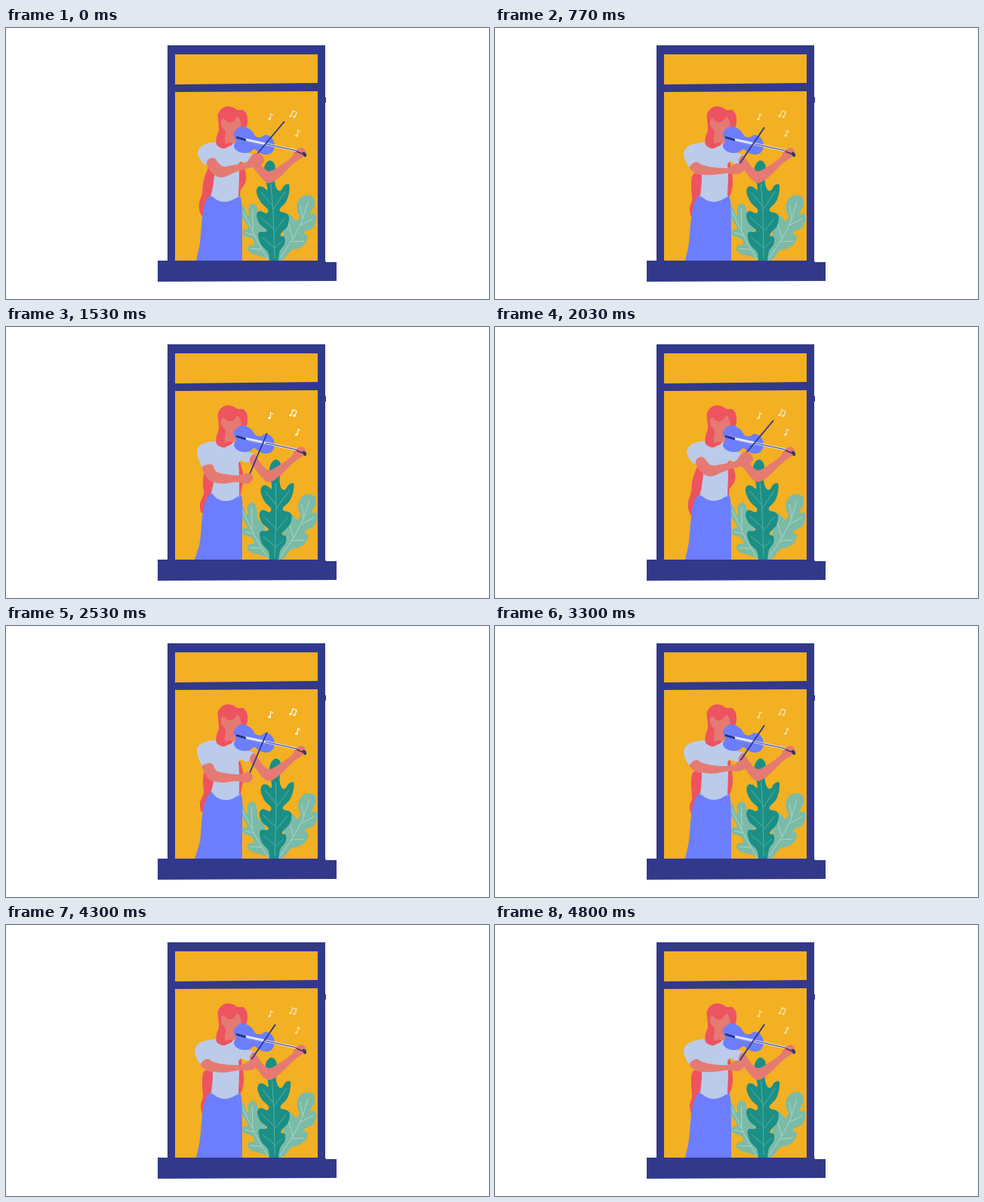
Animation, 640 px wide and 360 px high, one loop 5.01 s. Source, as an HTML page with a canvas:

```html
<!DOCTYPE html>
<html lang="en">
<head>
<meta charset="utf-8">
<title>Violinist at the window</title>
<style>
  html, body { margin: 0; width: 100%; height: 100%; overflow: hidden; background: #fff; }
  canvas { display: block; width: 640px; height: 360px; }
</style>
</head>
<body>
<canvas id="stage" width="640" height="360"></canvas>
<script>
const ctx = document.getElementById('stage').getContext('2d');
const LOOP = 5010;
const CHANGES = [0, 270, 500, 770, 1030, 1270, 1530, 1770, 2030, 2300,
  2530, 2800, 3030, 3300, 3530, 3800, 4070, 4300, 4570, 4800];

const navy = '#32398b', yellow = '#f2b022', red = '#ee5360', skin = '#e57a72',
  shirtBlue = '#bccbe9', blue = '#6c7efe', teal = '#1b8f86', mint = '#7bbba8', pale = '#b9dccb';

const points = text => text.trim().split(/\s+/).map(p => p.split(',').map(Number));

// Closed smooth outline; a repeated point makes a corner.
function blob(text, color) {
  const p = points(text), n = p.length;
  ctx.beginPath();
  ctx.moveTo(...p[0]);
  for (let i = 0; i < n; i++) {
    const [a, b, c, d] = [-1, 0, 1, 2].map(k => p[(i + k + n) % n]);
    ctx.bezierCurveTo(b[0] + (c[0] - a[0]) / 6, b[1] + (c[1] - a[1]) / 6,
      c[0] - (d[0] - b[0]) / 6, c[1] - (d[1] - b[1]) / 6, c[0], c[1]);
  }
  ctx.fillStyle = color;
  ctx.fill();
}

function poly(text, color) {
  ctx.beginPath();
  points(text).forEach(p => ctx.lineTo(...p));
  ctx.fillStyle = color;
  ctx.fill();
}

function line(text, color, width) {
  ctx.beginPath();
  points(text).forEach(p => ctx.lineTo(...p));
  ctx.strokeStyle = color;
  ctx.lineWidth = width;
  ctx.stroke();
}

// Leans a leaf sideways about its root on the sill.
function leaf(lean, outline, color, veins, veinColor) {
  ctx.save();
  ctx.transform(1, 0, -lean / 130, 1, lean / 130 * 309, 0);
  blob(outline, color);
  veins.forEach(v => line(v, veinColor, 0.8));
  ctx.restore();
}

const poses = [
  { // bow high
    lean: [0, 0, 0], notes: '#f4e4b8', ink: '#b8a878',
    hair: '274,178 265,193 261,207 260,219 256,233 257,245 263,251 268,235 276,215 300,226 309,226 311,215 317,206 318,195 313,180 300,170',
    shirt: '283,151 283,151 268,153 258,158 254,166 258,176 264,182 264,182 274,176 274,176 276,195 272,223 272,223 281,229 289,231 299,229 308,224 308,224 309,195 308,181 308,181 312,177 318,180 324,182 328,168 328,168 312,163 300,152',
    skirt: '272,222 272,222 264,231 260,252 257,285 252,309 252,309 313,309 313,309 313,270 312,230 308,222 308,222',
    arm: '266,180 269,174 276,173 282,180 289,184 307,181 319,178 325,170 332,166 339,169 342,176 338,182 330,184 318,187 303,192 289,198 279,197 271,190',
    bow: '333,167 369,124'
  },
  { // bow passing the middle
    lean: [2, 0, -1], notes: '#f7dc96', ink: '#f7dc96',
    hair: '272,190 262,195 260,210 261,228 258,239 260,250 265,243 272,222 300,226 309,226 314,215 315,202 313,188 311,178 300,170',
    shirt: '283,151 283,151 268,153 256,157 250,166 253,178 259,187 259,187 265,180 273,181 273,181 274,200 272,223 272,223 281,229 289,231 299,229 308,224 308,224 309,195 308,181 308,181 312,177 318,180 326,178 329,168 329,168 312,163 300,152',
    skirt: '272,222 272,222 265,230 260,252 257,285 252,309 252,309 313,309 313,309 313,270 312,230 308,222 308,222',
    arm: '258,186 262,180 268,178 275,182 289,185 308,186 318,184 324,179 331,178 333,183 330,190 322,193 308,193 290,196 276,195 266,193',
    bow: '323,182 357,132'
  },
  { // bow low
    lean: [8, 3, -3], notes: '#fff6dc', ink: '#9d8d67',
    hair: '272,190 263,194 261,208 262,222 257,235 259,247 265,243 272,222 300,226 309,226 313,212 315,200 312,186 309,178 300,170',
    shirt: '283,151 283,151 267,153 256,158 253,167 256,178 260,187 260,187 266,183 274,183 274,183 276,200 272,220 272,220 280,228 289,231 299,230 309,224 309,224 309,195 308,181 308,181 312,177 318,180 327,177 329,168 329,168 312,163 300,152',
    skirt: '272,221 272,221 265,230 260,252 257,285 250,309 250,309 313,309 313,309 313,270 313,230 309,222 309,222',
    arm: '260,187 266,183 273,183 277,190 283,194 303,197 315,196 322,194 327,199 325,205 319,208 305,206 288,208 275,206 267,201',
    bow: '323,195 346,141'
  }
];
// The return stroke holds the bowing hand a little lower.
poses[3] = { ...poses[1],
  arm: '258,186 262,180 268,178 275,182 289,185 308,186 318,181 326,180 330,184 328,191 321,194 308,193 290,195 276,195 266,193' };

function drawRoom() {
  ctx.fillStyle = '#fff';
  ctx.fillRect(0, 0, 640, 360);
  ctx.fillStyle = navy;
  ctx.fillRect(214, 23, 209, 290);
  ctx.fillRect(421, 92, 3, 7);
  ctx.fillStyle = yellow;
  poly('224,35 413,35 413,73 224,75', yellow);
  poly('224,85 413,84 413,309 224,309', yellow);
}

function drawPlant([darkLean, rightLean, leftLean]) {
  leaf(leftLean,
    '310,234 316,239 319,248 322,248 321,240 325,234 331,235 334,243 335,255 343,264 346,285 351,309 351,309 340,304 326,300 320,294 322,289 329,287 326,280 316,276 314,269 321,266 317,258 311,247',
    mint, ['314,243 324,264 334,285 347,307', '327,240 327,270', '317,272 329,275', '323,293 339,294'], pale);
  leaf(rightLean,
    '399,222 407,225 409,234 405,243 403,247 410,247 411,255 407,265 397,270 395,273 400,277 396,287 387,293 377,296 369,306 360,309 362,290 367,276 368,263 369,253 374,248 380,251 384,256 389,251 386,243 386,233 391,225',
    mint, ['400,231 392,257 381,279 363,306', '390,235 393,253', '407,253 390,262', '373,255 380,280', '395,283 378,284'], pale);
  leaf(darkLean,
    '350,176 356,181 357,192 356,204 359,214 364,216 369,209 375,208 375,219 371,231 363,240 364,244 371,246 375,251 373,263 365,272 364,276 369,278 369,287 363,296 361,309 361,309 349,309 349,309 347,298 338,288 334,276 336,271 343,271 345,268 336,260 332,249 336,243 345,246 347,241 338,232 332,219 334,211 340,211 346,215 345,206 342,197 342,186 345,179',
    teal, ['351,207 354,245 356,306', '338,218 353,236', '370,217 354,241', '337,251 355,267', '370,252 356,270', '339,278 356,292', '366,283 356,293'], '#65b9a9');
}

function drawHead() {
  blob('281,121 281,114 286,107 294,104 302,106 307,109 314,109 319,115 320,124 318,132 309,136 301,153 294,158 287,160 279,155 279,145 282,135', red);
  blob('288,120 294,125 301,124 307,118 311,125 311,136 306,147 302,153 295,152 291,154 290,147 291,138 286,131 285,124', skin);
}

function drawViolin() {
  blob('304,136 311,131 319,132 326,137 331,144 338,145 343,142 350,144 355,151 355,161 350,167 342,168 335,165 329,161 323,165 314,166 306,163 302,157 305,149 302,143', blue);
  line('317,148 385,163', '#dfe5fb', 3);
  line('319,151 343,157', '#8794d9', 1);
  line('305,145 318,149', '#27306f', 2.4);
  line('344,154 385,163', '#353c7c', 1.1);
}

function drawViolinArm() {
  blob('323,178 328,169 334,176 340,184 347,190 355,188 369,179 379,171 383,164 391,159 396,162 397,167 391,173 381,180 367,194 356,203 348,206 341,202 333,192', skin);
  line('385,164 397,169', '#323866', 1.4);
  blob('393,165 397,166 398,170 395,171', '#323866');
}

function note(x, y, double, { notes, ink }) {
  const stems = double ? `${x - 3},${y + 3} ${x - 1},${y - 4} ${x + 4},${y - 2} ${x + 2},${y + 4}`
    : `${x},${y + 3} ${x + 1},${y - 4} ${x + 4},${y - 2}`;
  line(stems, notes, 1.5);
  const dots = double ? [[x - 4, y + 3], [x + 1, y + 4]] : [[x - 1, y + 3]];
  for (const [cx, cy] of dots) {
    ctx.beginPath();
    ctx.ellipse(cx, cy, 2, 1.5, -0.3, 0, 7);
    ctx.fillStyle = notes;
    ctx.fill();
  }
  line(`${x + 1},${y - 3} ${x + 3},${y - 1}`, ink, 0.6);
}

function drawPose(pose) {
  drawRoom();
  drawPlant(pose.lean);
  blob(pose.hair, red);
  blob(pose.skirt, blue);
  blob(pose.arm, skin);
  blob(pose.shirt, shirtBlue);
  drawHead();
  drawViolin();
  drawViolinArm();
  line(pose.bow, navy, 1.9);
  // The forearm passes in front of the shirt, the sleeve over the shoulder.
  blob(pose.arm, skin);
  note(350, 118, false, pose);
  note(381, 114, true, pose);
  note(386, 140, false, pose);
  poly('201,309 423,309 424,311 438,311 438,336 201,337', navy);
}

function frame() {
  const time = performance.now() % LOOP;
  const step = CHANGES.filter(t => t <= time).length - 1;
  drawPose(poses[step % 4]);
  requestAnimationFrame(frame);
}
frame();
</script>
</body>
</html>
```
